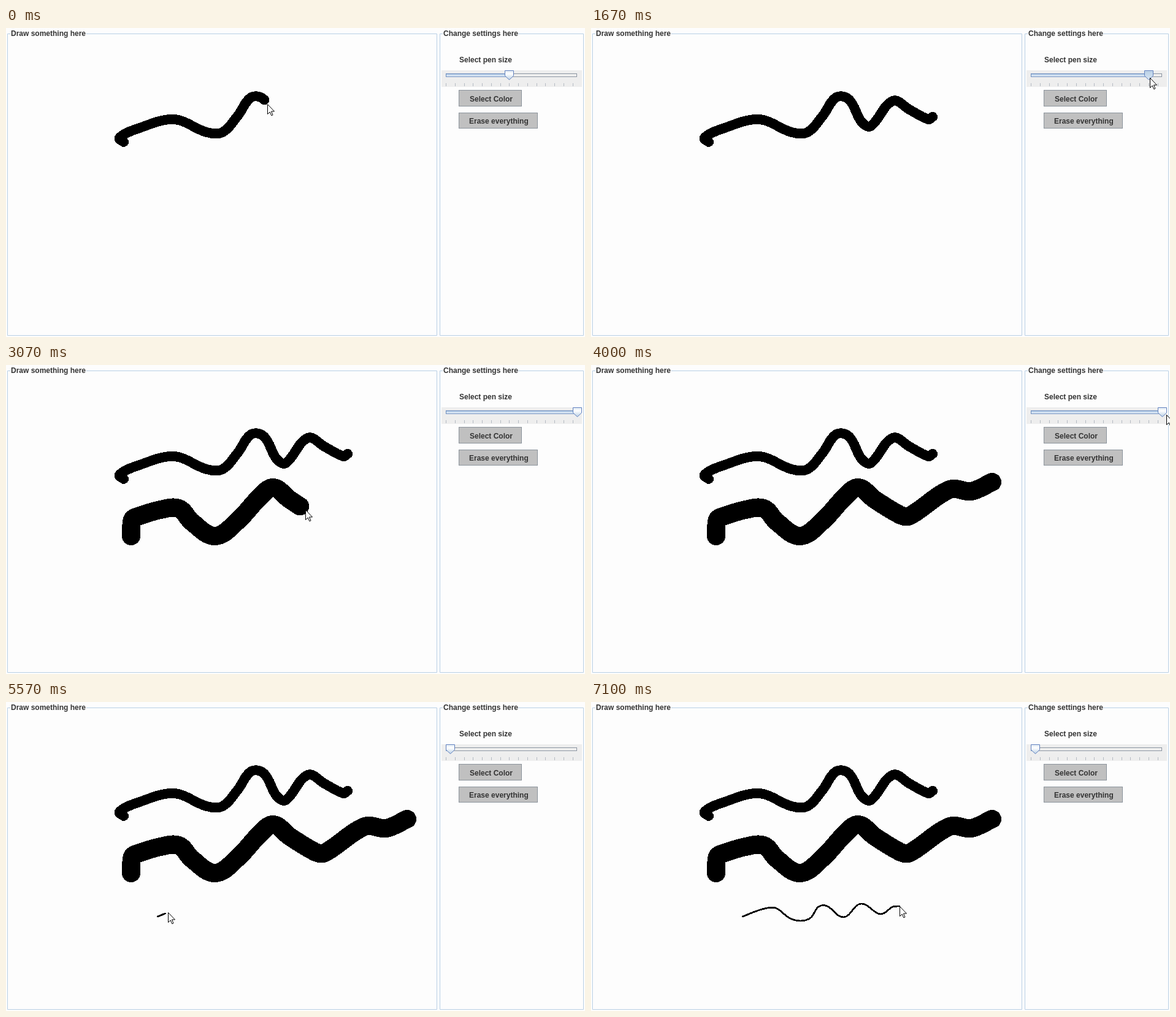
Write an HTML page that moves like this. It is 944 by 504 pixels and loops after 7.46 s.

```html
<!DOCTYPE html>
<html lang="en">
<head>
<meta charset="utf-8">
<title>Drawing pad</title>
<style>
  html, body { margin: 0; width: 100%; height: 100%; overflow: hidden; background: #fdfdfd; }
  svg { display: block; width: 944px; height: 504px; }
  text { font: bold 12px "Liberation Sans", Arial, sans-serif; fill: #333; }
  .frame { fill: none; stroke: #b8cfe5; }
  .button { fill: #c0c0c0; stroke: #8c949c; }
  .ink { fill: none; stroke: #000; stroke-linecap: round; stroke-linejoin: round; shape-rendering: crispEdges; }
  #ticks { stroke: #b4bac2; }
  #thumb { fill: url(#idle); stroke: #6382bf; }
  #thumb.pressed { fill: url(#held); }
</style>
</head>
<body>
<svg viewBox="0 0 944 504">
  <defs>
    <linearGradient id="idle" x2="0" y2="1">
      <stop offset="0" stop-color="#dde8f3"/><stop offset=".35" stop-color="#fff"/><stop offset="1" stop-color="#b8cfe5"/>
    </linearGradient>
    <linearGradient id="held" x2="0" y2="1">
      <stop offset="0" stop-color="#b8cfe5"/><stop offset="1" stop-color="#d8e6f4"/>
    </linearGradient>
    <linearGradient id="level" x2="0" y2="1">
      <stop offset="0" stop-color="#a3c0e0"/><stop offset="1" stop-color="#f0f6fc"/>
    </linearGradient>
  </defs>

  <path class="frame" d="M7 9.5H2.5V501.5H702.5V9.5H131"/>
  <path class="frame" d="M712 9.5H707.5V501.5H941.5V9.5H835"/>
  <text x="8" y="13">Draw something here</text>
  <text x="713" y="13">Change settings here</text>
  <text x="739" y="56">Select pen size</text>

  <rect x="710" y="69" width="229" height="27" fill="#eee"/>
  <rect x="717.5" y="74.5" width="213" height="5" fill="#eee" stroke="#8c96a2"/>
  <rect id="filled" x="717.5" y="74.5" height="5" fill="url(#level)" stroke="#6f8fbf"/>
  <path id="ticks"/>
  <path id="thumb" d="M-7 69.5H7V78L0 84.5L-7 78Z"/>

  <rect class="button" x="738.5" y="101.5" width="102" height="26"/>
  <text x="756" y="120">Select Color</text>
  <rect class="button" x="738.5" y="138.5" width="128" height="25"/>
  <text x="755" y="156">Erase everything</text>

  <g id="inks"></g>
  <path id="cursor" d="M.5 .5V16.5L4.2 13L6.8 18.8L9 17.8L6.5 12H11.5Z" fill="#fff" stroke="#000"/>
</svg>

<script>
const LOOP = 7460;
const POINTER_LEAD = 20;
const PEN_STEP = 7.38;
const byId = id => document.getElementById(id);

// Key points of each scribble; pace above 1 slows the hand towards the end.
const strokes = [
  { width: 16, start: -650, end: 430, pace: 1,
    points: `192,186 185,179 215,164 274,149 327,170 353,170 378,143 400,113 421,117
      441,153 456,160 492,119 519,133 550,149 557,145` },
  { width: 30, start: 2390, end: 3440, pace: 1,
    points: `204,279 206,252 215,247 252,236 282,234 303,256 341,279 378,254 414,215
      436,200 462,219 505,245 520,246 585,203 620,206 654,191` },
  { width: 2.8, start: 5520, end: 6960, pace: 1.25,
    points: `247,350 279,338 301,336 323,352 341,357 358,352 371,334 385,333 412,351
      440,329 472,346 492,334 503,333` }
];

// Pen sizes dragged on the slider; the pointer may overshoot the end of the track.
const drags = [
  { from: 15, to: 27, arrive: 1000, press: 1050, stop: 1480, release: 1680 },
  { from: 27, to: 30.7, arrive: 1680, press: 1680, stop: 1780, release: 1830 },
  { from: 30.7, to: 2, arrive: 3800, press: 4120, stop: 4690, release: 4880 }
];

const smooth = p => p * p * (3 - 2 * p);
const clamp = (v, low, high) => Math.min(high, Math.max(low, v));
const sliderX = pen => 717 + (pen - 1) * PEN_STEP;

// Smooth curve whose handles are a third of each span long.
function curveThrough(points) {
  const at = i => points[clamp(i, 0, points.length - 1)];
  const handle = (i, reach) => {
    const [x0, y0] = at(i - 1), [x1, y1] = at(i + 1), [x, y] = at(i);
    const scale = reach / Math.hypot(x1 - x0, y1 - y0);
    return [x + (x1 - x0) * scale, y + (y1 - y0) * scale];
  };
  let path = `M${points[0]}`;
  for (let i = 1; i < points.length; i++) {
    const [x0, y0] = at(i - 1), [x1, y1] = at(i);
    const reach = Math.hypot(x1 - x0, y1 - y0) / 3;
    path += `C${handle(i - 1, reach)} ${handle(i, -reach)} ${x1},${y1}`;
  }
  return path;
}

for (const stroke of strokes) {
  const points = stroke.points.trim().split(/\s+/).map(pair => pair.split(',').map(Number));
  const line = document.createElementNS(byId('inks').namespaceURI, 'path');
  line.setAttribute('class', 'ink');
  line.setAttribute('d', curveThrough(points));
  line.setAttribute('stroke-width', stroke.width);
  byId('inks').append(line);
  Object.assign(stroke, { line, length: line.getTotalLength(), first: points[0], last: points.at(-1) });
}

byId('ticks').setAttribute('d',
  Array.from({ length: 15 }, (_, i) => `M${Math.round(sliderX(1 + 2 * i)) + .5} 90V95`).join(''));

const penKeys = drags.flatMap(d => [[d.press, d.from], [d.stop, d.to]]);
const grip = pen => [sliderX(pen) + 2, 81];
const travelKeys = [
  ...strokes.flatMap(s => [[s.start, ...s.first], [s.end, ...s.last]]),
  ...drags.flatMap(d => [
    [d.arrive, ...grip(d.from)], [d.press, ...grip(d.from)],
    [d.stop, ...grip(d.to)], [d.release, ...grip(d.to)]
  ])
].sort((a, b) => a[0] - b[0]);

function sample(keys, t) {
  const next = keys.findIndex(key => key[0] > t);
  if (next === 0) return keys[0].slice(1);
  if (next < 0) return keys.at(-1).slice(1);
  const [t0, ...from] = keys[next - 1], [t1, ...to] = keys[next];
  const p = smooth((t - t0) / (t1 - t0));
  return from.map((v, i) => v + (to[i] - v) * p);
}

function drawnLength({ start, end, pace, length }, t) {
  const p = clamp((t - start) / (end - start), 0, 1);
  return length * (1 - (1 - p) ** pace);
}

function pointerAt(t) {
  const ahead = t + POINTER_LEAD;
  const active = strokes.find(s => ahead >= s.start && t < s.end);
  if (!active) return sample(travelKeys, t);
  const { x, y } = active.line.getPointAtLength(drawnLength(active, ahead));
  return [x, y];
}

function render(t) {
  for (const stroke of strokes) {
    stroke.line.style.visibility = t < stroke.start ? 'hidden' : 'visible';
    stroke.line.setAttribute('stroke-dasharray', `${drawnLength(stroke, t) + .01} 2000`);
  }
  const [x, y] = pointerAt(t).map(Math.round);
  byId('cursor').setAttribute('transform', `translate(${x} ${y})`);

  const thumbX = Math.round(sliderX(clamp(sample(penKeys, t)[0], 2, 30)));
  byId('thumb').setAttribute('transform', `translate(${thumbX + .5} 0)`);
  byId('thumb').classList.toggle('pressed', drags.some(d => t >= d.press && t < d.release));
  byId('filled').setAttribute('width', thumbX - 718);
}

const began = performance.now();
function tick() {
  render((performance.now() - began) % LOOP);
  requestAnimationFrame(tick);
}
tick();
</script>
</body>
</html>
```
